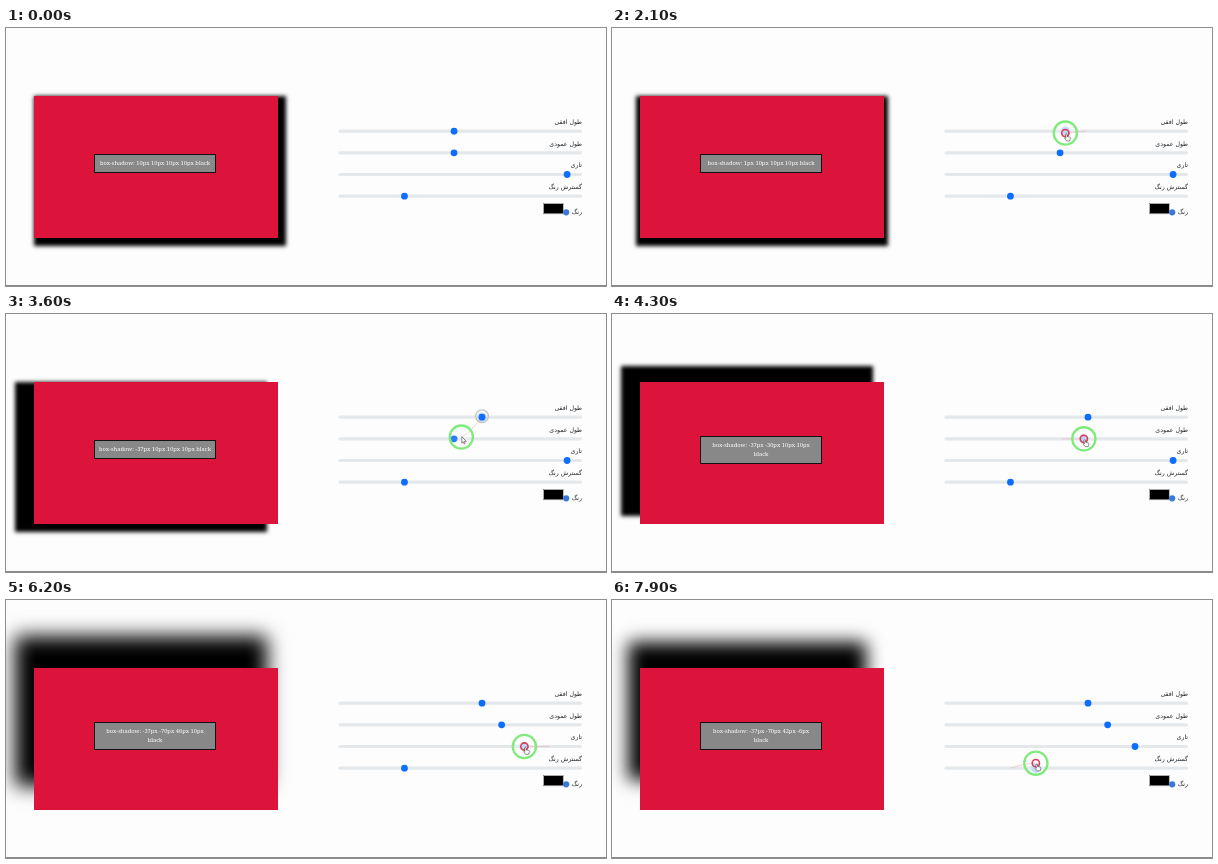
Recreate the animation shown at these times as an HTML page with a canvas. Size 600x258 px, loop 8 s.

```html
<!DOCTYPE html>
<html lang="fa">
<head>
<meta charset="utf-8">
<title>box-shadow</title>
<style>
html, body { margin: 0; width: 100%; height: 100%; overflow: hidden; background: #fdfdfd; }
#stage { position: relative; width: 600px; height: 258px; overflow: hidden; background: #fdfdfd; }
#box { position: absolute; left: 28px; top: 68px; width: 244px; height: 142px; background: #dc143c; }
#label {
  position: absolute; left: 88px; width: 122px; box-sizing: border-box;
  padding: 4px 0; border: 1px solid #111; background: #888; color: #fff;
  font: 5.75px/9px "Noto Serif", serif; text-align: center; white-space: pre;
}
canvas { position: absolute; left: 0; top: 0; width: 600px; height: 258px; }
</style>
</head>
<body>
<div id="stage">
  <div id="box"></div>
  <div id="label"></div>
  <canvas></canvas>
</div>
<script>
const LOOP = 8000, STEP = 100, SCALE = 0.4, START = 300, INITIAL = 10;
const TRACK = { left: 332.4, right: 576 };
const ZERO_X = 573, TRAVEL = 238;
const box = document.getElementById('box');
const label = document.getElementById('label');
const canvas = document.querySelector('canvas');
const ctx = canvas.getContext('2d');
const ratio = window.devicePixelRatio || 1;
canvas.width = 600 * ratio;
canvas.height = 258 * ratio;
ctx.scale(ratio, ratio);

// Right-to-left sliders; "from" and "to" bound the drag in ms.
const sliders = [
  { name: 'طول افقی', min: -200, max: 200, from: 900, to: 3300 },
  { name: 'طول عمودی', min: -200, max: 200, from: 3850, to: 5000 },
  { name: 'تاری', min: 0, max: 200, from: 5600, to: 6700 },
  { name: 'گسترش رنگ', min: -100, max: 50, from: 7500, to: LOOP },
];
sliders.forEach((s, i) => { s.y = 103.2 + i * 21.65; });
const [horizontal, vertical, blur, spread] = sliders;

const xOf = (s, value) => ZERO_X - (value - s.min) / (s.max - s.min) * TRAVEL;
const valueOf = (s, x) => Math.round(s.min + (ZERO_X - x) / TRAVEL * (s.max - s.min));

// Where the pointer comes to rest, either at a point or on a slider value.
const at = (time, x, y) => ({ time, x, y });
const on = (time, s, value, dy = 0) => at(time, xOf(s, value), s.y + dy);
const stops = [
  at(START, 440, 252), on(800, horizontal, INITIAL), on(900, horizontal, INITIAL),
  on(1610, horizontal, -34), on(1800, horizontal, -34), on(2600, horizontal, 77, 4),
  on(2932, horizontal, -37), on(3300, horizontal, -37),
  on(3750, vertical, INITIAL), on(3900, vertical, INITIAL), on(4700, vertical, -70),
  on(5050, vertical, -70), at(5150, 488, 131), on(5400, blur, INITIAL, -9.5),
  on(5600, blur, INITIAL), on(6300, blur, 48), on(6700, blur, 42), on(7000, blur, 42),
  at(7300, 405, 174), on(7500, spread, INITIAL), on(7600, spread, INITIAL),
  on(7900, spread, -6, -5),
];

const smooth = u => u * u * (3 - 2 * u);

function pointerAt(t) {
  const next = stops.findIndex(stop => stop.time > t);
  if (next < 1) return next ? stops[stops.length - 1] : stops[0];
  const a = stops[next - 1], b = stops[next];
  const k = smooth((t - a.time) / (b.time - a.time));
  const bend = Math.sin(k * Math.PI / 2);
  return { x: a.x + (b.x - a.x) * k, y: a.y + (b.y - a.y) * bend };
}

const isPressed = (s, t) => t >= s.from && t < s.to;
const valueAt = (s, t) => t < s.from ? INITIAL : valueOf(s, pointerAt(Math.min(t, s.to)).x);

function circle(x, y, r, fill, stroke, width) {
  ctx.beginPath();
  ctx.arc(x, y, r, 0, 2 * Math.PI);
  if (fill) { ctx.fillStyle = fill; ctx.fill(); }
  if (stroke) { ctx.strokeStyle = stroke; ctx.lineWidth = width; ctx.stroke(); }
}

function text(string, y) {
  ctx.fillStyle = '#212529';
  ctx.fillText(string, TRACK.right, y);
}

function drawSlider(s, value, t) {
  text(s.name, s.y - 7.2);
  ctx.fillStyle = '#e4e8eb';
  ctx.beginPath();
  ctx.roundRect(TRACK.left, s.y - 1.6, TRACK.right - TRACK.left, 3.2, 1.6);
  ctx.fill();
  const x = xOf(s, value);
  const focused = t >= s.from && !sliders.some(o => o.from > s.from && t >= o.from);
  if (focused) circle(x, s.y, 4.8, '#c3dafb');
  circle(x, s.y, 3.4, isPressed(s, t) ? '#b6d4fe' : '#0d6efd');
  const age = t - s.to;
  if (age >= 0 && age < 500) circle(x, s.y - 1, 4 + age / 125, null, '#c4c4c4', 1.3);
}

// The faster the pointer moved, the wider and redder the trail.
function drawTrail(t) {
  const dt = 20;
  ctx.lineCap = 'round';
  for (let s = Math.max(START, t - 300); s < t; s += dt) {
    const a = pointerAt(s), b = pointerAt(s + dt);
    const speed = Math.hypot(b.x - a.x, b.y - a.y) / dt;
    if (speed < 0.02) continue;
    ctx.strokeStyle = `rgba(232, 70, 75, ${Math.min(0.9, 0.2 + speed * 1.3)})`;
    ctx.lineWidth = Math.min(3, 0.4 + speed * speed * 9);
    ctx.beginPath();
    ctx.moveTo(a.x, a.y);
    ctx.lineTo(b.x, b.y);
    ctx.stroke();
  }
}

const arrow = new Path2D('M0 0V6L1.4 4.8L2.4 7L3.4 6.5L2.4 4.4H4.2Z');
const hand = new Path2D('M-.2 .4Q.6 -.4 1.2 .4V2.6L4 3.2Q4.6 3.4 4.5 4.4L3.8 7H.8L-1.2 4.4Q-.9 3.6-.2 4Z');

function drawPointer(t, pressed) {
  const { x, y } = pointerAt(t);
  circle(x, y, 11.6, 'rgba(255, 255, 255, .12)', '#80ea7c', 2.3);
  if (pressed) circle(x, y, 3.6, null, '#e23a50', 1.6);
  ctx.save();
  ctx.translate(x + 0.5, y + (pressed ? 0.8 : 0));
  const shape = pressed ? hand : arrow;
  ctx.fillStyle = '#fff';
  ctx.fill(shape);
  ctx.strokeStyle = '#444';
  ctx.lineWidth = 0.6;
  ctx.stroke(shape);
  ctx.restore();
}

function drawColorField() {
  text('رنگ', 185.5);
  ctx.fillStyle = '#000';
  ctx.fillRect(538, 176, 19, 9.5);
  ctx.strokeStyle = '#767676';
  ctx.lineWidth = 0.6;
  ctx.strokeRect(537.6, 175.6, 19.6, 10.2);
  circle(560.2, 184.3, 3.1, '#3b78d8');
}

function draw(t) {
  const values = sliders.map(s => valueAt(s, t));
  box.style.boxShadow = values.map(v => v * SCALE + 'px').join(' ') + ' black';

  const rule = `box-shadow: ${values.map(v => v + 'px').join(' ')} black`;
  const wraps = rule.length > 38;
  label.textContent = wraps ? rule.replace(' black', '\nblack') : rule;
  label.style.top = wraps ? '122px' : '126px';

  ctx.clearRect(0, 0, 600, 258);
  ctx.font = '6.2px "DejaVu Sans", sans-serif';
  ctx.textAlign = 'right';
  ctx.direction = 'rtl';
  sliders.forEach((s, i) => drawSlider(s, values[i], t));
  drawColorField();
  ctx.fillStyle = '#8a8a8a';
  ctx.fillRect(0, 257, 600, 1);

  if (t >= START) {
    drawTrail(t);
    drawPointer(t, sliders.some(s => isPressed(s, t)));
  }
}

function tick() {
  draw(Math.floor(performance.now() % LOOP / STEP) * STEP);
  requestAnimationFrame(tick);
}
tick();
</script>
</body>
</html>
```
